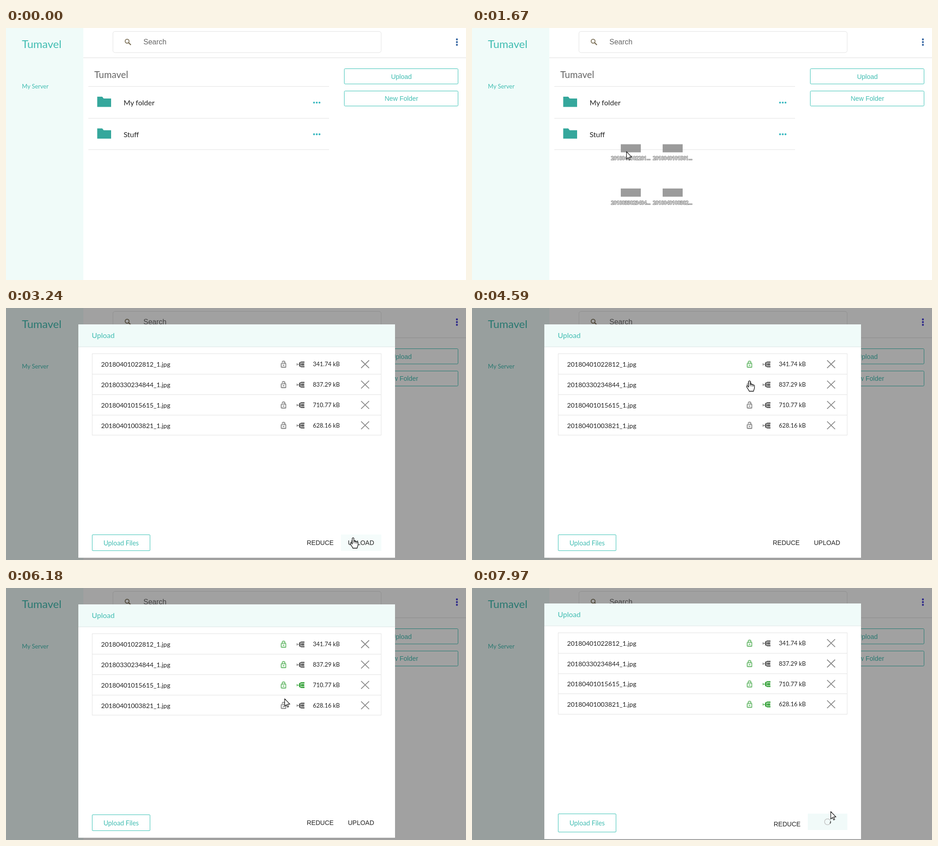
An HTML page that plays this animation: 1011x554 px, repeating every 8 s.

```html
<!DOCTYPE html>
<html lang="en">
<head>
<meta charset="utf-8">
<title>File upload</title>
<style>
html, body { margin: 0; width: 100%; height: 100%; overflow: hidden; background: #fff; }
svg { display: block; width: 1011px; height: 554px; font-family: Lato, sans-serif; }
text { fill: currentColor; }
.teal { color: #41bdb2; }
.sans { font-family: "Liberation Sans", Arial, sans-serif; }
.mid { text-anchor: middle; }
.rule { fill: none; stroke: #e2e2e2; shape-rendering: crispEdges; }
.btn { fill: none; stroke: #3ac2b5; }
.line { fill: none; stroke: currentColor; }
.action { font-size: 14px; color: #222; }

/* Hard switches */
.sw { animation: 8s step-end infinite; }
#dots { fill: #3d6ba5; animation-name: dots; }
#modal { animation-name: modal; }
#idle { animation-name: idle; }
#busy { animation-name: busy; }
#body { animation-name: lift; }
#hover { animation-name: hover; }
#arrow { animation-name: arrow; }
#hand { animation-name: hand; }
.toggle { color: #666; }
.shackle { opacity: 0; }
@keyframes dots { 28.75%, to { fill: #4a42dc; } }
@keyframes modal { 0% { visibility: hidden; } 28.75%, to { visibility: visible; } }
@keyframes idle { 98.375%, to { opacity: 0; } }
@keyframes busy { 0% { opacity: 0; } 98.375%, to { opacity: 1; } }
@keyframes lift { 98.375%, to { transform: translateY(-2.3px); } }
@keyframes hover { 0%, 45%, to { opacity: 0; } 38.875%, 95% { opacity: 1; } }
@keyframes hand {
  0%, 45%, 56.25%, 62.5%, 73.125%, 82.5%, 98.375%, to { opacity: 0; }
  38.875%, 50.25%, 57.25%, 65.375%, 77.5%, 95% { opacity: 1; }
}
@keyframes arrow {
  0%, 45%, 56.25%, 62.5%, 73.125%, 82.5%, 98.375%, to { opacity: 1; }
  38.875%, 50.25%, 57.25%, 65.375%, 77.5%, 95% { opacity: 0; }
}
@keyframes lock0 { 54.75%, to { color: #43a847; opacity: 1; } }
@keyframes lock1 { 60.875%, to { color: #43a847; opacity: 1; } }
@keyframes lock2 { 72.75%, to { color: #43a847; opacity: 1; } }
@keyframes lock3 { 79.125%, to { color: #43a847; opacity: 1; } }
@keyframes clamp2 { 68.25%, to { color: #43a847; } }
@keyframes clamp3 { 81.75%, to { color: #43a847; } }

/* Motion */
#ghost { animation: drag 8s infinite, held 8s step-end infinite; }
@keyframes held { 0%, 28.5%, to { visibility: hidden; } 19.375% { visibility: visible; } }
@keyframes drag {
  0%, 19.6875% { transform: translate(-544px, -137px); animation-timing-function: cubic-bezier(.25, .5, .45, 1); }
  21.875%, to { transform: none; }
}
#pointer { animation: move 8s cubic-bezier(.4, 0, .4, 1) infinite, seen 8s step-end infinite; }
@keyframes seen { 0%, 3.875% { visibility: hidden; } 1.75%, 19.375%, to { visibility: visible; } }
@keyframes move {
  0%, 1.75% { transform: translate(696px, 530px); animation-timing-function: linear; }
  3.75% { transform: translate(62px, 380px); }
  19.375%, 19.6875% { transform: translate(-123px, 155px); animation-timing-function: cubic-bezier(.25, .5, .45, 1); }
  21.875%, 34.875% { transform: translate(421px, 292px); }
  38.625% { transform: translate(785px, 494px); }
  40.5%, 44.5% { transform: translate(763px, 505px); }
  49.5% { transform: translate(616px, 102px); }
  52.25%, 55.625% { transform: translate(609.5px, 120px); }
  57.375% { transform: translate(610px, 160px); }
  58.25%, 61.875% { transform: translate(609px, 165px); }
  66.25%, 68.25% { transform: translate(644.5px, 208px); }
  69.875%, 72.75% { transform: translate(609.5px, 215px); }
  73.75%, 76% { transform: translate(620px, 222px); }
  77.25% { transform: translate(612px, 243px); }
  78%, 79.375% { transform: translate(610px, 256px); }
  80.625%, 82% { transform: translate(647px, 256px); }
  86%, 86.375% { transform: translate(692px, 329px); }
  95.875% { transform: translate(781px, 507px); }
  96.5%, 98.375% { transform: translate(781px, 508px); }
  99.625%, to { transform: translate(788px, 491px); }
}
#arc { transform-origin: 781.5px 514px; animation: spin 1s linear infinite; }
@keyframes spin { to { transform: rotate(360deg); } }
</style>
</head>
<body>
<svg viewBox="0 0 1011 554">
  <rect width="1011" height="554" fill="#fff"/>
  <rect width="170" height="554" fill="#f0fbf9"/>
  <g class="teal">
    <text x="35" y="44" font-size="24">Tumavel</text>
    <text x="35" y="133" font-size="13">My Server</text>
  </g>

  <path d="M170 65.5H1011" stroke="#dedede"/>
  <rect x="235" y="7.5" width="589.5" height="46.5" rx="4.5" fill="#fff" stroke="#e2e2e2"/>
  <g fill="none" stroke="#75694f" stroke-width="1.7">
    <circle cx="266.2" cy="29" r="4.3"/>
    <path d="M269.5 32.3L274.5 37.3" stroke-width="2.2"/>
  </g>
  <text x="302" y="36" font-size="16" class="sans" color="#666">Search</text>
  <g id="dots" class="sw">
    <circle cx="991" cy="25" r="2.2"/><circle cx="991" cy="31" r="2.2"/><circle cx="991" cy="37" r="2.2"/>
  </g>

  <text x="194" y="110.3" font-size="20.6" color="#666">Tumavel</text>
  <path class="rule" d="M181 128.5H710M181 198.5H710M181 267.5H710"/>
  <g id="folders" font-size="16" color="#222"></g>

  <g class="teal sans mid" font-size="14.4">
    <rect class="btn" x="743.5" y="89.5" width="250" height="33.5" rx="2"/>
    <text x="869" y="111.5">Upload</text>
    <rect class="btn" x="743.5" y="138.5" width="250" height="33" rx="2"/>
    <text x="869" y="160.3">New Folder</text>
  </g>

  <g id="ghost" class="mid" opacity=".85" font-family="Open Sans, sans-serif" font-size="10.5"></g>

  <g id="modal" class="sw">
    <rect width="1011" height="554" fill="#000" opacity=".37"/>
    <g id="idle" class="sw">
      <rect x="159" y="36" width="696" height="513" fill="#fff"/>
      <rect class="btn" x="189.5" y="498.5" width="127" height="35" rx="1.5"/>
      <rect id="hover" class="sw" x="736" y="498" width="89" height="36" fill="#f5fcfb"/>
      <g class="action sans">
        <text x="661" y="521">REDUCE</text>
        <text x="751.5" y="521">UPLOAD</text>
      </g>
    </g>
    <g id="busy" class="sw">
      <rect x="159" y="34" width="696" height="518" fill="#fff"/>
      <rect class="btn" x="189.5" y="496.5" width="127" height="40" rx="1.5"/>
      <rect x="738" y="496" width="87" height="36" fill="#f1faf9"/>
      <text x="663" y="524" class="action sans">REDUCE</text>
      <circle cx="781.5" cy="514" r="6.6" fill="none" stroke="#c4c4c4" stroke-width="1.5"/>
      <path id="arc" d="M788.1 514A6.6 6.6 0 0 1 786.2 518.6" fill="none" stroke="#333" stroke-width="1.6"/>
    </g>
    <text x="253" y="522" font-size="14.4" class="teal mid">Upload Files</text>
    <g id="body" class="sw">
      <rect x="159" y="36" width="696" height="49" fill="#f0fbf9"/>
      <path d="M159 85.5H855" stroke="#dde5e4"/>
      <text x="188.5" y="66.3" font-size="16" class="teal">Upload</text>
      <rect class="rule" x="189.5" y="100.5" width="635" height="179"/>
      <g id="rows" color="#222"></g>
    </g>
  </g>

  <g id="pointer" fill="#fff" stroke="#111" stroke-linejoin="round">
    <path id="arrow" class="sw" stroke-width="1.2" d="M.5 .5V17L4.3 13.4 6.8 19 9.2 18 6.8 12.4H12z"/>
    <g id="hand" class="sw" stroke-width="1.3">
      <path d="M-2 14V1.9a1.8 1.8 0 0 1 3.6 0V8c.8-1 3-.9 3.4.5.9-.8 2.7-.5 3 .8 1-.6 2.8-.1 2.8 1.6V15c0 3-1.6 4.5-2 8H-.8C-1 20-5.5 16.5-6.3 13c-.5-1.8 1.7-2.6 2.8-1.2z"/>
      <path d="M1.6 8v4M5 8.5V12.5M8 9.3V13" fill="none" stroke-width="1"/>
    </g>
  </g>
</svg>
<script>
const fill = (id, items, draw) => {
  document.getElementById(id).innerHTML = items.map(draw).join('');
};

fill('folders', ['My folder', 'Stuff'], (name, i) => `
  <g transform="translate(0 ${i * 69.7})">
    <path d="M200.5 151h11l3.2 4h16.3v18.5h-30.5z" fill="#35a79c"/>
    <text x="258.5" y="170">${name}</text>
    <g fill="#38b8bf">${[677, 683, 689].map(x => `<circle cx="${x}" cy="164" r="2.1"/>`).join('')}</g>
  </g>`);

const files = [
  ['20180401022812_1.jpg', '341.74 kB'],
  ['20180330234844_1.jpg', '837.29 kB'],
  ['20180401015615_1.jpg', '710.77 kB'],
  ['20180401003821_1.jpg', '628.16 kB'],
];

const lock = i => `
  <g class="toggle sw" style="animation-name:lock${i}" transform="translate(601.4 115.3) scale(.714)" stroke-width="2.2">
    <rect class="line" x="5" y="9" width="14" height="12" rx="1"/>
    <path class="line" d="M8 6a4 4 0 0 1 8 0v3"/>
    <path class="line shackle sw" style="animation-name:lock${i}" d="M8 9V6"/>
    <circle cx="12" cy="15" r="2" fill="currentColor"/>
  </g>`;

const clamp = i => `
  <g class="toggle sw" style="animation-name:clamp${i}" fill="currentColor">
    <path d="M656 117.5H649L644 120V128L649 130.5H656V127.5H647.5V120.5H656z"/>
    <rect x="648.5" y="121.5" width="7" height="5"/>
    <path class="line" stroke-width="1.2" d="M639.6 121.5v5M639.5 124H649"/>
  </g>`;

fill('rows', files, ([name, size], i) => `
  <g transform="translate(0 ${i * 44.8})">
    ${i ? '<path class="rule" d="M190 100.7H824"/>' : ''}
    <text x="209" y="129.2" font-size="14.2">${name}</text>
    ${lock(i)}${clamp(i)}
    <text x="674.5" y="128.3" font-size="13">${size}</text>
    <path d="M780.5 115L798 132M798 115L780.5 132" stroke="#8a8a8a" stroke-width="1.8"/>
  </g>`);

// Dragged thumbnails: two columns, two rows
fill('ghost', files, ([name], i) => `
  <g transform="translate(${431 + 92 * (i >> 1)} ${285 + 97.5 * (i % 2)})">
    <rect x="-22" y="-9" width="44" height="18" fill="#8a8a8a"/>
    <text y="26" stroke="#777" stroke-width="2" paint-order="stroke" color="#fff">${name.slice(0, 13)}...</text>
  </g>`);
</script>
</body>
</html>
```
